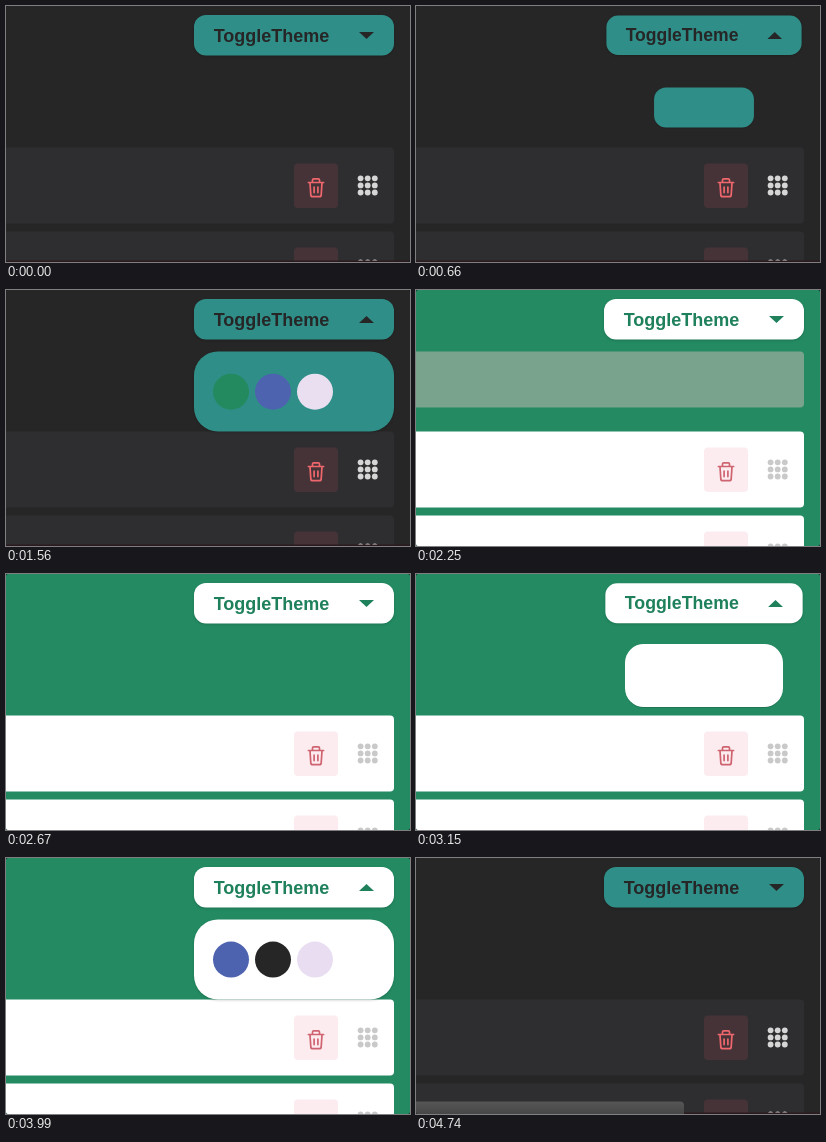
Animation, 404 px wide and 256 px high, one loop 5.55 s. Source, as an HTML page:

```html
<!DOCTYPE html>
<html lang="en">
<head>
<meta charset="utf-8">
<title>Theme toggle</title>
<style>
  html, body { margin: 0; width: 100%; height: 100%; overflow: hidden; background: #1b1b1c; }
  svg { display: block; width: 404px; height: 256px; border-radius: 2px; background: var(--page); }
  .dark {
    --page: #262627; --row: #2e2e31; --accent: #2f8f88; --ink: #262627;
    --trash-bg: #463338; --trash: #ef676d; --grip: #d6d6d6;
  }
  .green {
    --page: #238a62; --row: #ffffff; --accent: #ffffff; --ink: #1f805c;
    --trash-bg: #fcecef; --trash: #cf6470; --grip: #c9c9c9;
  }
  .row { fill: var(--row); }
  .trash-bg { fill: var(--trash-bg); }
  .trash { fill: none; stroke: var(--trash); stroke-width: 1.7; stroke-linecap: round; stroke-linejoin: round; }
  .grip { fill: var(--grip); }
  .accent { fill: var(--accent); }
  .ink { fill: var(--ink); }
  text { font: bold 18px "Liberation Sans", Arial, sans-serif; }
  .soft { filter: drop-shadow(0 1px 1px rgba(0, 0, 0, .16)); }
</style>
</head>
<body>
<svg id="stage" class="dark" viewBox="0 0 404 256">
  <defs>
    <linearGradient id="bubbleFill" x1="0" y1="0" x2="0" y2="1">
      <stop offset="0" stop-color="#565657"/>
      <stop offset="1" stop-color="#474748"/>
    </linearGradient>
  </defs>
  <rect id="hover" x="-10" y="61.5" width="398" height="56" rx="4" fill="#7aa38e"/>
  <g id="rows"></g>
  <rect id="edge" y="254.5" width="404" height="1.5" fill="#2a1a1e"/>
  <g id="button">
    <rect class="accent soft" x="188" y="9" width="200" height="40.5" rx="12"/>
    <text class="ink" x="207.7" y="35.5">ToggleTheme</text>
    <path id="arrow" class="ink"/>
  </g>
  <g id="panel">
    <rect class="accent soft" x="188" y="61.5" width="200" height="80" rx="24"/>
  </g>
  <g id="swatches">
    <circle cx="225" cy="101.5" r="18"/>
    <circle cx="267" cy="101.5" r="18"/>
    <circle cx="309" cy="101.5" r="18"/>
  </g>
  <path id="bubble" d="M0 243.5H264a4 4 0 0 1 4 4V256H0Z" fill="url(#bubbleFill)"/>
</svg>
<script>
const LOOP = 5550;
const HOLD = 62;          // press to release, ms
const SWATCH_DELAY = 455; // panel opening to swatches, ms
const CYCLES = [
  { theme: 'dark', press: 540, close: 2250, swatches: ['#238a60', '#4d63b0', '#eadff1'] },
  { theme: 'green', press: 3000, close: 4350, swatches: ['#4d63b0', '#262627', '#e9def1'] }
];
const $ = id => document.getElementById(id);
const clamp = x => Math.max(0, Math.min(1, x));

function rowMarkup(y) {
  let dots = '';
  for (let i = 0; i < 9; i++)
    dots += `<circle cx="${354.6 + 7.1 * (i % 3)}" cy="${30.8 + 7.1 * Math.floor(i / 3)}" r="2.9"/>`;
  return `<g transform="translate(0 ${y})">
    <rect class="row" x="-10" width="398" height="76" rx="4"/>
    <rect class="trash-bg" x="288" y="16" width="44" height="44.5" rx="4"/>
    <path class="trash" d="M302.4 35H317.6M306.5 35V32.6q0-1.3 1.3-1.3h4.4q1.3 0 1.3 1.3V35
      M304 35.4l.8 12q.1 1.8 1.9 1.8h6.6q1.8 0 1.9-1.8l.8-12M308.1 39.5v5.6M311.9 39.5v5.6"/>
    <g class="grip">${dots}</g></g>`;
}
$('rows').innerHTML = rowMarkup(141.5) + rowMarkup(225.5);

// Unit step response of an underdamped spring, ms in.
function spring(ms, stiffness, damping) {
  if (ms <= 0) return 0;
  const t = ms / 1000, decay = damping / 2;
  const w = Math.sqrt(stiffness - decay * decay);
  return 1 - Math.exp(-decay * t) * (Math.cos(w * t) + decay / w * Math.sin(w * t));
}
const scaleSpring = ms => spring(ms, 550, 30);
const dropSpring = ms => spring(ms, 500, 25);

const scaleAbout = (x, y, s) => `translate(${x} ${y}) scale(${s}) translate(${-x} ${-y})`;
const show = (id, on) => $(id).setAttribute('visibility', on ? 'visible' : 'hidden');

function render(t) {
  const cycle = t >= CYCLES[0].close && t < CYCLES[1].close ? CYCLES[1] : CYCLES[0];
  const pressed = t - cycle.press;
  const opened = pressed - HOLD;
  const open = opened >= 0 && t < cycle.close;

  $('stage').setAttribute('class', cycle.theme);
  show('edge', cycle.theme === 'dark');
  show('hover', t >= 2250 && t < 2670);

  const dip = t < cycle.close ? .05 * (scaleSpring(pressed) - scaleSpring(opened)) : 0;
  $('button').setAttribute('transform', scaleAbout(288, 29.25, 1 - dip));
  $('arrow').setAttribute('d', open ? 'M353 33L360.5 26L368 33Z' : 'M353 26L360.5 33L368 26Z');

  show('panel', open);
  $('panel').setAttribute('transform', scaleAbout(288, 101.5, scaleSpring(opened)));

  const dropped = opened - SWATCH_DELAY;
  show('swatches', open && dropped > 0);
  const fade = clamp(dropped / 300);
  [...$('swatches').children].forEach((dot, i) => {
    dot.setAttribute('fill', cycle.swatches[i]);
    dot.setAttribute('fill-opacity', fade);
  });
  $('swatches').setAttribute('transform', `translate(0 ${100 * (dropSpring(dropped) - 1)})`);

  $('bubble').setAttribute('opacity', clamp((t - 4560) / 180));
}

const start = performance.now();
function tick() {
  render((performance.now() - start) % LOOP);
  requestAnimationFrame(tick);
}
tick();
</script>
</body>
</html>
```
